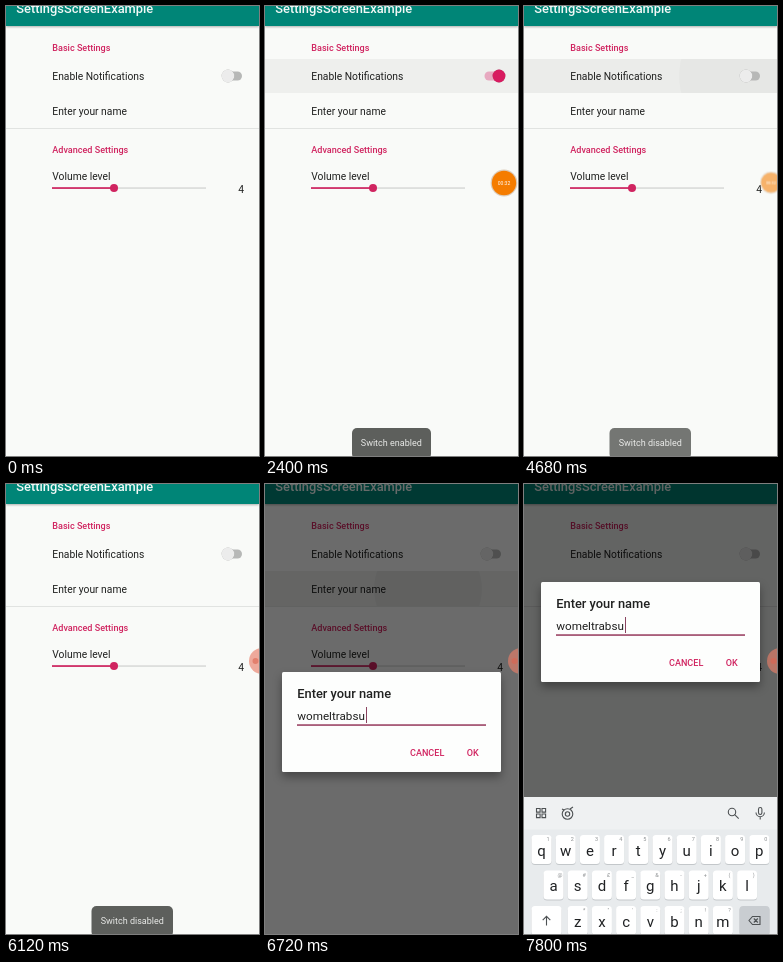
An HTML page for the animation above (8 s loop, 253x450 px).

```html
<!DOCTYPE html>
<html lang="en">
<head>
<meta charset="utf-8">
<title>Settings screen</title>
<style>
  html, body { margin: 0; width: 100%; height: 100%; overflow: hidden; background: #f9faf8; }
  svg { display: block; width: 100vw; height: 100vh; }
  text { font-family: Roboto, sans-serif; font-size: 10.3px; fill: #202120; }
  .medium { font-weight: 500; }
  .accent { fill: #d02460; font-size: 9.05px; }
  .heading { font-size: 12.88px; }
  .center { text-anchor: middle; }
  .toast text { font-size: 9.02px; fill: #e8e9e7; text-anchor: middle; }
  .bubble text { font-size: 5px; fill: #fff; text-anchor: middle; }
  .line { fill: none; stroke: #4d5153; stroke-width: 1.1; }
  .hint { font-size: 5.5px; fill: #8d9092; text-anchor: middle; }
  .letter { font-size: 15px; fill: #202224; text-anchor: middle; }

  /* Poses hold until the next keyframe; 1.5% is one 120 ms tick. */
  .anim { animation: 8s step-end infinite; }
  .on { animation-name: on; }
  .off { animation-name: off; }
  .thumb { animation-name: slide; }
  .press { animation-name: press; }
  .wave { animation-name: wave; }
  .name-press { animation-name: name-press; }
  .name-wave { animation-name: name-wave; }
  .toast-on { animation-name: toast-on; }
  .toast-off { animation-name: toast-off; }
  .bubble { animation-name: bubble; }
  .docked { animation-name: docked; }
  .sec0 { animation-name: sec0; }
  .sec1 { animation-name: sec1; }
  .sec2 { animation-name: sec2; }
  .dim { animation-name: dim; }
  .dialog { animation-name: dialog; }
  .keyboard { animation-name: keyboard; }

  @keyframes on {
    0%, 58.5%, 100% { opacity: 0; }
    25.5% { opacity: .5; }
    27% { opacity: 1; }
    57% { opacity: .5; }
  }
  @keyframes off {
    0%, 58.5%, 100% { opacity: 1; }
    25.5% { opacity: .5; }
    27% { opacity: 0; }
    57% { opacity: .5; }
  }
  @keyframes slide {
    0%, 58.5%, 100% { transform: none; }
    25.5%, 57% { transform: translateX(6px); }
    27% { transform: translateX(12px); }
  }
  @keyframes press {
    0%, 33%, 64.5%, 100% { opacity: 0; }
    24%, 55.5% { opacity: .5; }
    25.5%, 28.5%, 57%, 60% { opacity: 1; }
    30%, 61.5% { opacity: .6; }
    31.5%, 63% { opacity: .25; }
  }
  @keyframes wave {
    0%, 33%, 64.5%, 100% { transform: scale(0); }
    24%, 55.5% { transform: scale(.2); }
    25.5%, 57% { transform: scale(.46); }
    27%, 58.5% { transform: scale(.72); }
    28.5%, 60% { transform: scale(1.2); }
    30%, 61.5% { transform: scale(2.3); }
  }
  @keyframes name-press {
    0%, 87%, 100% { opacity: 0; }
    81% { opacity: .6; }
    82.5%, 84% { opacity: 1; }
    85.5% { opacity: .5; }
  }
  @keyframes name-wave {
    0%, 87%, 100% { transform: scale(0); }
    81% { transform: scale(.16); }
    82.5% { transform: scale(.34); }
    84% { transform: scale(.54); }
    85.5% { transform: scale(1); }
  }
  @keyframes toast-on {
    0%, 57%, 100% { opacity: 0; }
    27% { opacity: .4; }
    28.5% { opacity: .85; }
    30% { opacity: 1; }
    55.5% { opacity: .5; }
  }
  @keyframes toast-off {
    0%, 82.5%, 100% { opacity: 0; }
    57% { opacity: .4; }
    58.5% { opacity: .85; }
    60% { opacity: 1; }
    81% { opacity: .5; }
  }
  @keyframes bubble {
    0% { transform: translate(28px, 0); opacity: 0; }
    3% { transform: translate(28px, 0); opacity: 1; animation-timing-function: steps(4, start); }
    9% { transform: none; opacity: 1; }
    34.5% { transform: none; opacity: 1; animation-timing-function: steps(4, start); }
    40.5% { transform: translate(8px, -.5px) scale(.82); opacity: .57; }
    63%, 100% { transform: translate(8px, -.5px) scale(.82); opacity: 0; }
  }
  @keyframes docked { 0%, 100% { opacity: 0; } 63% { opacity: 1; } }
  @keyframes sec0 { 0% { opacity: 1; } 13.5%, 100% { opacity: 0; } }
  @keyframes sec1 { 0%, 100% { opacity: 0; } 13.5% { opacity: 1; } 25.5% { opacity: 0; } }
  @keyframes sec2 { 0%, 100% { opacity: 0; } 25.5% { opacity: 1; } }
  @keyframes dim {
    0%, 100% { opacity: 0; }
    82.5% { opacity: .28; }
    84% { opacity: .57; }
    85.5% { opacity: .6; }
  }
  @keyframes dialog {
    0%, 100% { opacity: 0; transform: none; }
    82.5% { opacity: .5; transform: none; }
    84% { opacity: 1; transform: none; }
    87% { opacity: 1; transform: translateY(-38px); }
    88.5% { opacity: 1; transform: translateY(-76px); }
    90% { opacity: 1; transform: translateY(-90px); }
  }
  @keyframes keyboard {
    0%, 100% { transform: translateY(140px); }
    85.5% { transform: translateY(95px); }
    87% { transform: translateY(40px); }
    88.5% { transform: translateY(10px); }
    90% { transform: none; }
  }
</style>
</head>
<body>
<svg viewBox="0 0 253 450" preserveAspectRatio="none">
  <defs>
    <clipPath id="switch-row"><rect y="53" width="253" height="34"/></clipPath>
    <clipPath id="name-row"><rect y="87" width="253" height="35.5"/></clipPath>
  </defs>
  <rect width="253" height="450" fill="#f9faf8"/>

  <g class="anim press" clip-path="url(#switch-row)">
    <rect y="53" width="253" height="34" fill-opacity=".055"/>
    <g transform="translate(227 70)"><circle class="anim wave" r="100" fill-opacity=".025"/></g>
  </g>
  <g class="anim name-press" clip-path="url(#name-row)">
    <rect y="87" width="253" height="36" fill-opacity=".06"/>
    <g transform="translate(163 105)"><circle class="anim name-wave" r="100" fill-opacity=".04"/></g>
  </g>

  <rect y="-5" width="253" height="25" fill="#008577" style="filter:drop-shadow(0 1px 1.2px rgba(0,0,0,.3))"/>
  <text class="medium heading" x="10.3" y="7.3" style="fill:#f2f8f6">SettingsScreenExample</text>

  <text class="medium accent" x="46.3" y="45.2">Basic Settings</text>
  <text x="46.3" y="74">Enable Notifications</text>
  <text x="46.3" y="108.5">Enter your name</text>
  <rect y="122" width="253" height="1" fill="#e1e3e1"/>
  <text class="medium accent" x="46.3" y="147.2">Advanced Settings</text>
  <text x="46.3" y="173.6">Volume level</text>
  <text x="232.2" y="187.4">4</text>

  <rect x="46" y="181.4" width="154" height="1.3" fill="#d2d3d2"/>
  <rect x="46" y="181.2" width="62" height="1.7" fill="#d02460"/>
  <circle cx="108" cy="182.1" r="4" fill="#d02460"/>

  <rect class="anim off" x="219" y="65.5" width="17" height="9" rx="4.5" fill="#b7b8b7"/>
  <rect class="anim on" x="219.5" y="65.5" width="17" height="9" rx="4.5" fill="#e7a9c0"/>
  <g class="anim thumb" style="filter:drop-shadow(0 .6px .6px rgba(0,0,0,.3))">
    <circle class="anim off" cx="222" cy="70" r="6.4" fill="#ececec"/>
    <circle class="anim on" cx="222" cy="70" r="6.4" fill="#d81b60"/>
  </g>

  <g class="anim toast toast-on">
    <rect x="87" y="422" width="79" height="31" rx="5" fill="#5d5f5c"/>
    <text x="126.3" y="440.3">Switch enabled</text>
  </g>
  <g class="anim toast toast-off">
    <rect x="85.5" y="422" width="81.5" height="31" rx="5" fill="#5d5f5c"/>
    <text x="126.3" y="440.3">Switch disabled</text>
  </g>

  <rect class="anim dim" width="253" height="450"/>

  <g transform="translate(239 177)">
    <g class="anim bubble">
      <circle r="13.4" fill="#dccdbd"/>
      <circle r="12.2" fill="#f57c00"/>
      <text class="anim sec0" y="1.8">00:30</text>
      <text class="anim sec1" y="1.8">00:31</text>
      <text class="anim sec2" y="1.8">00:32</text>
    </g>
  </g>
  <g class="anim docked">
    <circle cx="256" cy="177" r="13" fill="#e87e68" fill-opacity=".65"/>
    <circle cx="249.5" cy="177" r="3" fill="#dc6450" fill-opacity=".6"/>
  </g>

  <g class="anim dialog">
    <rect x="17" y="188" width="219" height="100" rx="1.5" fill="#fdfefd" style="filter:drop-shadow(0 5px 5px rgba(0,0,0,.35))"/>
    <text class="medium heading" x="32.2" y="213.6">Enter your name</text>
    <text x="32.2" y="236" style="font-size:11.7px">womeltrabsu</text>
    <rect x="101" y="223" width="1" height="16" fill="#8a4460"/>
    <rect x="32" y="240.3" width="189" height="1.5" fill="#96395c"/>
    <text class="medium accent" x="145" y="271.8">CANCEL</text>
    <text class="medium accent" x="201.8" y="271.8">OK</text>
  </g>

  <g class="anim keyboard" id="keyboard">
    <rect y="313" width="253" height="140" fill="#e8ebed"/>
    <rect y="313" width="253" height="32.5" fill="#eff1f2"/>
    <g class="line">
      <path d="M12.5 324.5h3.6v3.6h-3.6zM18 324.5h3.6v3.6H18zM12.5 330h3.6v3.6h-3.6zM18 330h3.6v3.6H18z"/>
      <circle cx="43.5" cy="330" r="5.3"/>
      <circle cx="43.5" cy="330" r="2.2"/>
      <path d="M38 325l2 1M46 325l3-2M41.5 329h.8M45 329h.8"/>
      <circle cx="208" cy="328" r="3.7"/>
      <path d="M210.7 330.7l4 4"/>
      <rect x="234.5" y="323.5" width="3.4" height="7" rx="1.7"/>
      <path d="M232 328.5a4.2 4.2 0 0 0 8.4 0M236.2 332.8v2.6"/>
    </g>
  </g>
</svg>
<script>
  const keyboard = document.getElementById('keyboard');

  function add(tag, attrs, label = '') {
    const node = document.createElementNS('http://www.w3.org/2000/svg', tag);
    for (const name in attrs) node.setAttribute(name, attrs[name]);
    node.textContent = label;
    keyboard.append(node);
  }

  function addKey(x, y, width, fill = '#fff') {
    const box = { x, y, width, height: 29, rx: 3.5 };
    add('rect', { ...box, y: y + 1, fill: '#c3c7ca' });
    add('rect', { ...box, fill });
  }

  const rows = [
    { letters: 'qwertyuiop', hints: '1234567890', x: 17.5, y: 351 },
    { letters: 'asdfghjkl', hints: '@#£_&-+()', x: 29.5, y: 386.5 },
    { letters: 'zxcvbnm', hints: '*"\':;!?', x: 53.7, y: 422 }
  ];
  for (const { letters, hints, x, y } of rows) {
    [...letters].forEach((letter, i) => {
      const cx = x + i * 24.2;
      addKey(cx - 10, y, 20);
      add('text', { class: 'letter', x: cx, y: y + 20.5 }, letter);
      add('text', { class: 'hint', x: cx + 6.6, y: y + 6 }, hints[i]);
    });
  }

  addKey(7.5, 422, 30);
  add('path', { class: 'line', d: 'M22.5 441.5v-9M18.7 436.2l3.8-3.8 3.8 3.8' });
  addKey(215.5, 422, 30, '#c9cdd1');
  add('path', { class: 'line', d: 'M228.5 432.5h7.5v8h-7.5l-3.5-4zM229.8 434.5l4 4M233.8 434.5l-4 4' });
</script>
</body>
</html>
```
